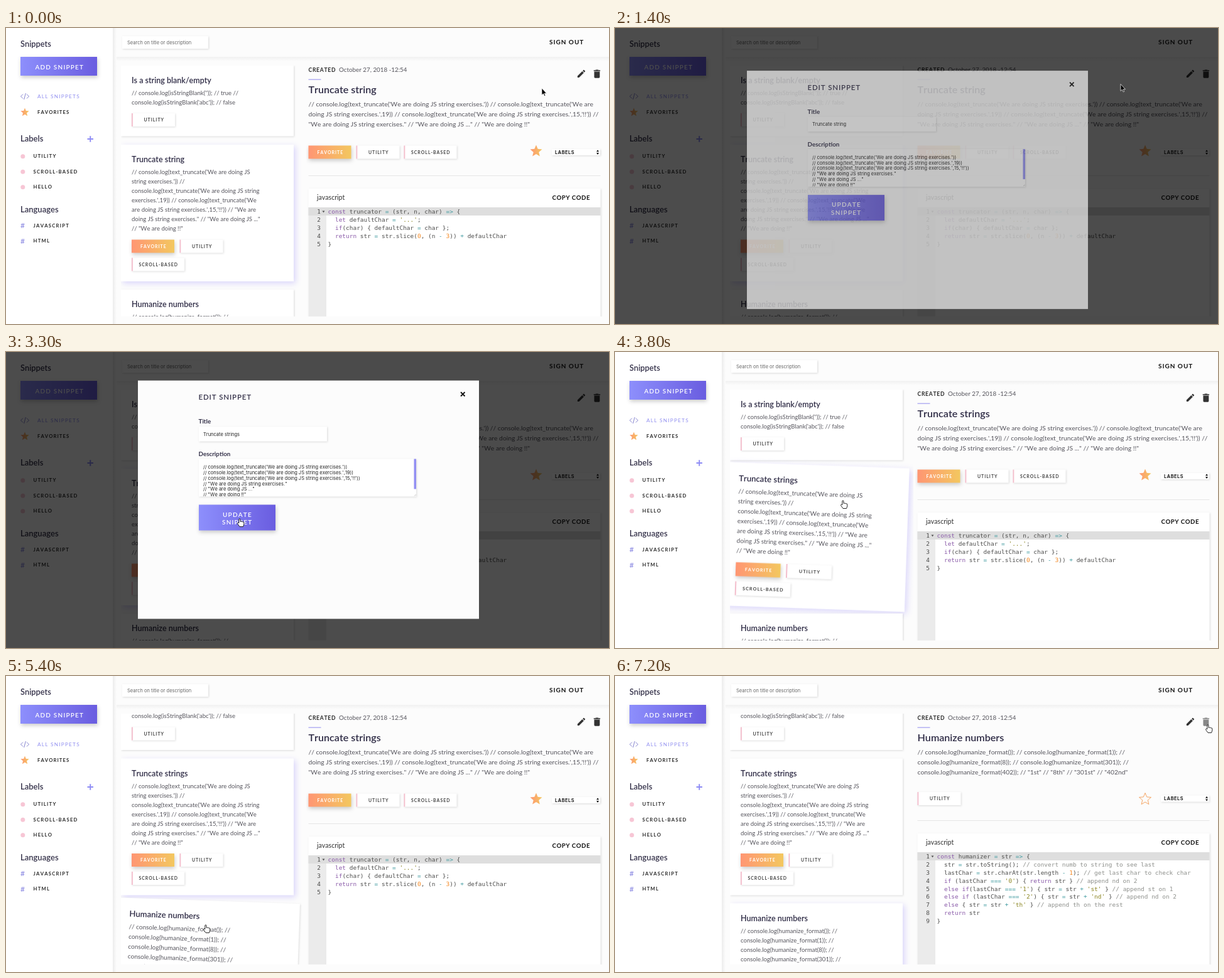
Write an HTML page that moves like this. It is 960 px wide and 472 px high and loops after 7300 ms.

```html
<!DOCTYPE html>
<html lang="en">
<head>
<meta charset="utf-8">
<title>Snippets</title>
<style>
html, body { margin: 0; width: 100%; height: 100%; overflow: hidden; background: #fcfcfc; }
svg { display: block; }
text { font: 9.5px Lato, sans-serif; font-kerning: none; fill: #55545c; white-space: pre; }
.head { font-size: 13px; font-weight: 600; fill: #35324a; }
.title { font-size: 12.5px; font-weight: 600; fill: #2e2b45; }
.big { font-size: 16.1px; font-weight: 600; fill: #2e2b45; }
.desc { font-size: 10.3px; }
.nav { font-size: 7.7px; font-weight: 700; letter-spacing: 1.25px; fill: #2b2b2b; }
.tag { font-size: 6.9px; font-weight: 700; letter-spacing: 1px; fill: #444; }
.btn { font-size: 10px; font-weight: 600; letter-spacing: 1.2px; fill: #fff; }
.caps { font-size: 10px; font-weight: 700; letter-spacing: 1px; fill: #111; }
.label { font-size: 9.8px; font-weight: 700; fill: #35324a; }
.input { font: 7.5px Inter, sans-serif; font-kerning: none; fill: #222; }
.code { font: 9.46px "DejaVu Sans Mono", monospace; fill: #4d4d4c; }
.box { fill: #fff; filter: drop-shadow(1px 1.5px 1.5px #0002); }
.picked { filter: drop-shadow(3px 3px 5px #d9d4fa); }
.lift { filter: drop-shadow(1px 3px 3px #0003); }
</style>
</head>
<body>
<script>
const LOOP = 7300, SCROLL = 54.5;

const text = (x, y, s, cls = '', attrs = '') => `<text x="${x}" y="${y}" class="${cls}" ${attrs}>${s}</text>`;
const rect = (x, y, w, h, fill, attrs = '') =>
  `<rect x="${x}" y="${y}" width="${w}" height="${h}" ${fill ? `fill="${fill}"` : ''} ${attrs}/>`;
const box = (x, y, w, h) => rect(x, y, w, h, '', 'class="box"');
const lines = (x, y, step, rows, cls) => rows.map((s, i) => text(x, y + i * step, s, cls)).join('');
const group = (id, body, attrs = '') => `<g id="${id}" ${attrs}>${body}</g>`;

const star = (cx, cy, r, attrs) => {
  const points = Array.from({ length: 10 }, (_, i) => {
    const a = i * Math.PI / 5, d = i % 2 ? r * 0.45 : r;
    return `${(cx + d * Math.sin(a)).toFixed(2)},${(cy - d * Math.cos(a)).toFixed(2)}`;
  });
  return `<polygon points="${points.join(' ')}" ${attrs}/>`;
};

const tag = (x, y, name) => {
  if (name === 'FAVORITE')
    return rect(x, y, 68, 21, 'url(#warm)', 'class="lift"') + text(x + 14, y + 13, name, 'tag', 'style="fill:#fff"');
  const long = name.length > 8;
  return box(x, y, long ? 84 : 69, 21) + rect(x, y, 1.8, 21, '#f3bccb') +
    text(x + (long ? 11.5 : 19.5), y + 13, name, 'tag');
};

const card = (id, y, h, title, rows, tagRows) => group(id,
  rect(183, y, 275, h, '', 'class="box"') + text(200, y + 28.3, title, 'title') +
  lines(200, y + 47, 15, rows) +
  tagRows.map((names, r) => names.map((n, i) =>
    tag(200 + i * 76.5, y + 61.5 + 15 * (rows.length - 1) + 29 * r, n)).join('')).join(''));

const paint = { comment: '#8e908c', string: '#8a8420', keyword: '#8959a8', number: '#f5871f', operator: '#3e999f' };
const kinds = Object.keys(paint);
const highlight = s => s.replace(
  /(\/\/.*)|('[^']*')|\b(const|let|if|else|return)\b|\b(\d+)\b|(=>|===|[=+-])/g,
  (m, ...parts) => `<tspan fill="${paint[kinds[parts.findIndex(Boolean)]]}">${m}</tspan>`);

const editor = (y, rows) =>
  box(481.5, y, 465, 220) + text(495, y + 17.8, 'javascript', '', 'style="font-size:10.6px;fill:#333"') +
  text(869.5, y + 17.8, 'COPY CODE', 'caps', 'style="font-size:9.7px;letter-spacing:.5px"') +
  rect(481.5, y + 30, 28.5, 200, '#ebebeb') + rect(481.5, y + 30, 465, 13, '#dedede') +
  `<path d="M503.5 ${y + 35.5}h4l-2 3z" fill="#555"/>` +
  rows.map((s, i) => text(501, y + 40 + i * 12.88, i + 1, 'code', 'text-anchor="end"') +
    text(512.6, y + 40 + i * 12.88, highlight(s), 'code')).join('');

const detail = (id, title, rows, tags, dy, starAttrs, code) => group(id,
  text(481.5, 104.3, title, 'big') + lines(481.5, 124.5, 16.3, rows, 'desc') +
  tags.map((n, i) => tag(481.5 + i * 76, 187.5 - dy / 2, n)).join('') +
  star(844, 196.5, 10, starAttrs) +
  box(869, 193 - dy / 2, 77, 10) +
  text(874, 200.6 - dy / 2, 'LABELS', 'input', 'style="font-weight:600;font-size:7.3px;letter-spacing:.6px;fill:#000"') +
  `<path d="M940 ${197.3 - dy / 2}l2-3 2 3zm0 1.6l2 3 2-3z" fill="#111"/>` +
  rect(481.5, 235 - dy, 465, 1, '#e6e6e6') + editor(256 - dy, code));

const sidebar = rect(0, 0, 170, 472, '#fff') + rect(170, 0, 6, 472, 'url(#edge)') +
  text(23, 30, 'Snippets', 'head', 'style="font-size:12.8px"') +
  rect(23, 46, 122, 30, 'url(#violet)', 'class="lift"') + text(46.5, 65.5, 'ADD SNIPPET', 'btn') +
  '<path d="M27 105.5l-3.5 3.5 3.5 3.5M33 105.5l3.5 3.5-3.5 3.5M31.3 104l-2.6 10" fill="none" stroke="#8583cf"/>' +
  text(50, 111.8, 'ALL SNIPPETS', 'nav', 'style="font-size:8.2px;font-weight:400;fill:#918ff0"') +
  star(30, 134.5, 7, 'fill="url(#warm)"') + text(50, 137.3, 'FAVORITES', 'nav', 'style="letter-spacing:1.05px"') +
  text(23, 181.3, 'Labels', 'head') + text(23, 294.3, 'Languages', 'head') +
  '<path d="M129.5 177h9.5M134.25 172.25v9.5" stroke="#8f8df5" stroke-width="2"/>' +
  ['UTILITY', 'SCROLL-BASED', 'HELLO'].map((s, i) =>
    `<circle cx="26.8" cy="${204.7 + i * 24.5}" r="3.5" fill="#f7c6d5"/>` + text(43.5, 207.3 + i * 24.5, s, 'nav')).join('') +
  ['JAVASCRIPT', 'HTML'].map((s, i) =>
    text(23, 319 + i * 24.5, '#', '', 'style="font-size:12px;fill:#8381e0"') + text(43.5, 317.5 + i * 24.5, s, 'nav')).join('');

const header = rect(171, 46, 789, 7, 'url(#under)') + box(185, 13, 137, 20) +
  text(193, 26, 'Search on title or description', 'input', 'style="fill:#666"') + text(865, 26, 'SIGN OUT', 'caps');

const truncRows = [
  "// console.log(text_truncate('We are doing JS", "string exercises.')) //",
  "console.log(text_truncate('We are doing JS string", "exercises.',19)) // console.log(text_truncate('We",
  "are doing JS string exercises.',15,'!!')) // \"We are", 'doing JS string exercises." // "We are doing JS ..."',
  '// "We are doing !!"'];
const humanRows = ['// console.log(humanize_format()); //',
  ...[1, 8, 301, 402].map(n => `console.log(humanize_format(${n})); //`), '"1st" // "8th" // "301st" // "402nd"'];

const list = group('list',
  card('card1', 59.5, 113, 'Is a string blank/empty',
    ["// console.log(isStringBlank('')); // true //", "console.log(isStringBlank('abc')); // false"], [['UTILITY']]) +
  card('card2', 186, 218, 'Truncate string', truncRows, [['FAVORITE', 'UTILITY'], ['SCROLL-BASED']]) +
  card('card3', 417, 172, 'Humanize numbers', humanRows, [['UTILITY']]));

const icons = '<path id="pencil" transform="translate(907.8 64.8) scale(.68)" d="M3 17.25V21h3.75L17.8 9.9l-3.75-3.75zM20.7 7c.4-.4.4-1 0-1.4l-2.3-2.3c-.4-.4-1-.4-1.4 0l-1.9 1.8 3.8 3.8z"/>' +
  '<path id="trash" transform="translate(932 64.3) scale(.74)" d="M6 19q0 2 2 2h8q2 0 2-2V7H6zM19 4h-3.5l-1-1h-5l-1 1H5v2h14z"/>';

const details = text(481.5, 70.3, 'CREATED', 'nav', 'style="font-size:8.6px;letter-spacing:.7px"') +
  text(530, 70.3, 'October 27, 2018 -12:54', '', 'style="font-size:9.8px"') + rect(481.5, 81.5, 20, 1.3, '#a9a5f2') + icons +
  detail('truncate', 'Truncate string', [
    "// console.log(text_truncate('We are doing JS string exercises.')) // console.log(text_truncate('We are",
    "doing JS string exercises.',19)) // console.log(text_truncate('We are doing JS string exercises.',15,'!!')) //",
    '"We are doing JS string exercises." // "We are doing JS ..." // "We are doing !!"'],
    ['FAVORITE', 'UTILITY', 'SCROLL-BASED'], 0, 'fill="url(#warm)"', [
      'const truncator = (str, n, char) => {', "  let defaultChar = '...';", '  if(char) { defaultChar = char };',
      '  return str = str.slice(0, (n - 3)) + defaultChar', '}']) +
  detail('humanize', 'Humanize numbers', [
    '// console.log(humanize_format()); // console.log(humanize_format(1)); //',
    'console.log(humanize_format(8)); // console.log(humanize_format(301)); //',
    'console.log(humanize_format(402)); // "1st" // "8th" // "301st" // "402nd"'],
    ['UTILITY'], 5, 'fill="none" stroke="#f5a564"', [
      'const humanizer = str => {', '  str = str.toString(); // convert numb to string to see last',
      '  lastChar = str.charAt(str.length - 1); // get last char to check char',
      "  if (lastChar === '0') { return str } // append nd on 2",
      "  else if(lastChar === '1') { str = str + 'st' } // append st on 1",
      "  else if (lastChar === '2') { str = str + 'nd' } // append nd on 2",
      "  else { str = str + 'th' } // append th on the rest", '  return str', '}']);

const modal = group('modal', rect(210, 46, 543, 380, '#fcfcfc') +
  text(306.5, 76.5, 'EDIT SNIPPET', 'head', 'style="font-size:11.5px;letter-spacing:.85px"') +
  '<path d="M724 64.5l6.5 6.5m0-6.5l-6.5 6.5" stroke="#111" stroke-width="1.8"/>' +
  text(306.5, 114.6, 'Title', 'label') + box(307, 119.5, 204, 23.5) + text(314, 134, 'Truncate string', 'input', 'id="field"') +
  text(306.5, 166.8, 'Description', 'label') + box(307, 171, 346, 60) +
  `<g clip-path="url(#area)">${lines(314, 186.6, 8.8, [
    "// console.log(text_truncate('We are doing JS string exercises.'))",
    "// console.log(text_truncate('We are doing JS string exercises.',19))",
    "// console.log(text_truncate('We are doing JS string exercises.',15,'!!'))",
    '// "We are doing JS string exercises."', '// "We are doing JS ..."', '// "We are doing !!"'], 'input')}</g>` +
  rect(649.5, 171, 3.5, 48, '#9390f3') + '<path d="M650 230l2.5-2.5M651.5 230l1-1" stroke="#999" stroke-width=".5"/>' +
  rect(307, 244, 122, 41, 'url(#violet)', 'class="lift"') +
  text(345, 263.3, 'UPDATE', 'btn') + text(344, 275.8, 'SNIPPET', 'btn'));

const pointer = '<g id="pointer">' +
  '<path id="arrow" d="M0 0V11L2.5 8.7 4.2 12.5 5.8 11.8 4.2 8.2H7.5Z" stroke="#fff" stroke-width=".7"/>' +
  '<path id="hand" d="M-1.2 7V1a1.1 1.1 0 0 1 2.2 0V4.5a1.1 1.1 0 0 1 2 .3 1.1 1.1 0 0 1 2 .5 1 1 0 0 1 1.8 .6V9L5.5 12.5H0L-3.5 7.6a1.1 1.1 0 0 1 1.6-1.3Z" fill="#fff" stroke="#111" stroke-width=".9"/>' +
  '<path id="beam" d="M-2-5q2 0 2 1.5q0-1.5 2-1.5M0-3.5V4.5M-2 6q2 0 2-1.5q0 1.5 2 1.5" fill="none" stroke="#111"/></g>';

const gradient = (id, from, to, down) =>
  `<linearGradient id="${id}" ${down ? 'x2="0" y2="1"' : ''}><stop stop-color="${from}"/><stop offset="1" stop-color="${to}"/></linearGradient>`;
const clip = (id, ...r) => `<clipPath id="${id}">${rect(...r)}</clipPath>`;

document.body.innerHTML = `<svg width="960" height="472"><defs>
  ${gradient('violet', '#8d8ffc', '#6a5de0')}${gradient('warm', '#ff9673', '#f3c75f')}
  ${gradient('edge', '#ececec', '#fcfcfc')}${gradient('under', '#f1f1f1', '#fcfcfc', true)}
  ${clip('column', 183, 60, 292, 400)}${clip('pane', 478, 50, 474, 410)}${clip('area', 307, 171, 346, 59.5)}</defs>
  ${rect(0, 0, 960, 472, '#fcfcfc')}${header}${sidebar}
  <g clip-path="url(#column)">${list}</g><g clip-path="url(#pane)">${details}</g>
  ${rect(0, 0, 960, 472, '#000', 'id="shade"')}${modal}${pointer}</svg>`;

const $ = id => document.getElementById(id);
const cardTitle = document.querySelector('#card2 .title');
const detailTitle = document.querySelector('#truncate .big');
const card2Box = document.querySelector('#card2 .box'), card3Box = document.querySelector('#card3 .box');

// departure, arrival, x, y, shape at rest; an arrow is shown on longer trips
const stops = [
  [0, 0, 853, 96, 'arrow'], [450, 1050, 915, 73, 'hand'], [1150, 1940, 454, 142, 'beam'],
  [2750, 3200, 372, 266, 'hand'], [3350, 3750, 363, 237, 'hand'], [3820, 4250, 309, 267, 'hand'],
  [4800, 5370, 318, 397, 'hand'], [5650, 6700, 944, 78, 'hand']];

const ramp = (t, a, b) => Math.min(1, Math.max(0, (t - a) / (b - a)));
const ease = (t, a, b) => { const u = ramp(t, a, b); return u * u * (3 - 2 * u); };
const show = (id, on) => $(id).style.display = on ? '' : 'none';
const tilt = (id, cy, k) =>
  $(id).setAttribute('transform', `translate(320.5 ${cy}) rotate(${2 * k}) scale(${1 + 0.05 * k}) translate(-320.5 ${-cy})`);

function movePointer(t) {
  const i = stops.findLastIndex(s => s[0] <= t);
  const [leave, arrive, x, y, shape] = stops[i], [, , fromX, fromY] = stops[Math.max(0, i - 1)];
  const k = ease(t, leave, arrive + 0.001);
  const overCards = t > 3350 && t < 5900;
  const current = k > 0.97 || overCards ? shape : 'arrow';
  $('pointer').setAttribute('transform', `translate(${fromX + (x - fromX) * k} ${fromY + (y - fromY) * k})`);
  for (const name of ['arrow', 'hand', 'beam']) show(name, name === current);
}

function draw(t) {
  const renamed = t >= 3350, second = t >= 5560;
  $('list').setAttribute('transform', `translate(0 ${-SCROLL * ease(t, 4250, 4750)})`);
  tilt('card2', 295, ease(t, 3450, 3700) - ease(t, 5130, 5350));
  tilt('card3', 503, ease(t, 5150, 5400) - ease(t, 5900, 6150));
  cardTitle.textContent = detailTitle.textContent = renamed ? 'Truncate strings' : 'Truncate string';
  card2Box.classList.toggle('picked', !second);
  card3Box.classList.toggle('picked', second);
  show('truncate', !second);
  show('humanize', second);
  $('pencil').setAttribute('fill', t > 980 && t < 1200 ? '#888' : '#333');
  $('trash').setAttribute('fill', t > 6600 ? '#888' : '#333');

  const closing = ramp(t, 3320, 3480);
  const open = 1 - (1 - ramp(t, 1230, 1630)) ** 2;
  $('shade').setAttribute('opacity', 0.7 * ramp(t, 1180, 1260) * (1 - closing));
  $('modal').setAttribute('opacity', open * (1 - closing));
  $('modal').setAttribute('transform', `translate(0 ${69 * (1 - open) - 0.5})`);
  $('field').textContent = t >= 2600 ? 'Truncate strings' : 'Truncate string';
  movePointer(t);
}

const start = performance.now();
function tick() {
  draw((performance.now() - start) % LOOP);
  requestAnimationFrame(tick);
}
tick();
</script>
</body>
</html>
```
